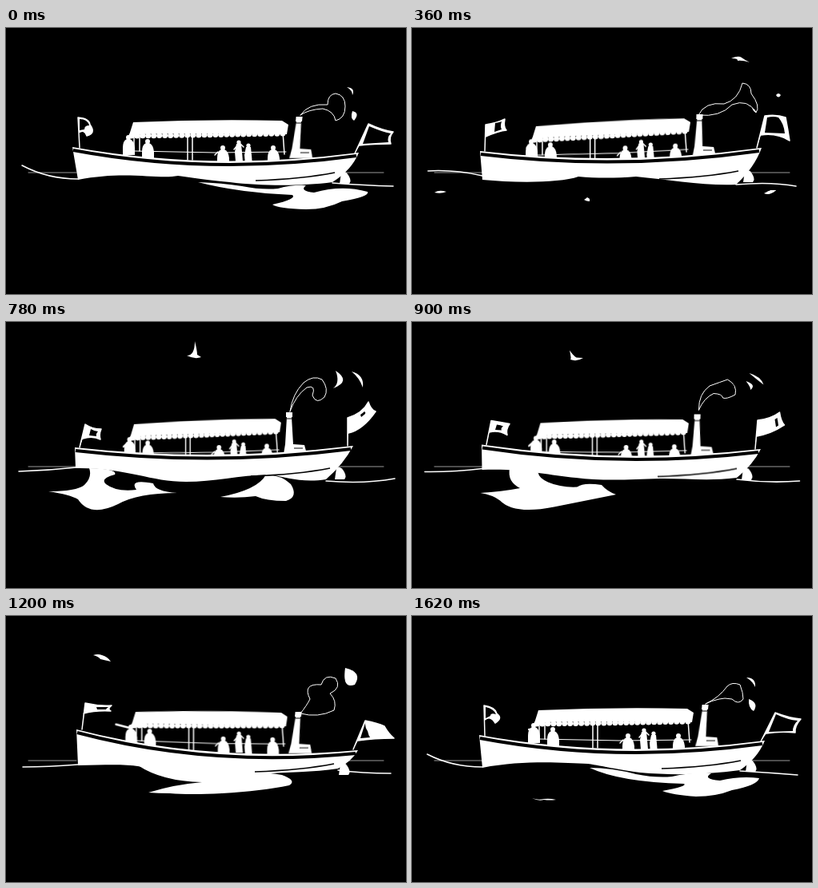
An HTML page without scripts that plays this animation: 500x333 px, repeating every 1680 ms.

```html
<!DOCTYPE html>
<html lang="en">
<head>
<meta charset="utf-8">
<title>Steam launch</title>
<style>
html, body { margin: 0; width: 100%; height: 100%; overflow: hidden; background: #000; }
svg { display: block; width: 100%; height: 100%; }
.white { fill: #fff; }
.line { fill: none; stroke: #fff; stroke-width: 1.5; stroke-linecap: round; stroke-linejoin: round; }
.thin { stroke-width: 1; }

/* Each segment advances in 60 ms steps; the rest pose is both first and last. */
.move { animation: 1680ms steps(6) infinite; }

.hull { animation-name: hull; d: path("M83,149Q255,180 441,156Q432,178 408,193C370,198 320,198 280,193C250,190 235,188 215,185C190,190 150,178 90,190Z"); }
@keyframes hull {
  21.42% { animation-timing-function: steps(7); d: path("M85,154Q258,174 437,150Q428,175 405,196C370,198 320,190 280,186C255,188 230,188 208,186C185,194 130,194 88,190Z"); }
  46.42% { animation-timing-function: steps(4); d: path("M86,157Q260,176 434,155Q422,178 400,197C370,202 350,194 330,191C290,192 260,200 225,200C180,200 150,182 87,183Z"); }
  60.71% { animation-timing-function: steps(3); d: path("M88,150Q258,181 438,163Q430,180 412,193C370,197 330,197 290,201C250,203 210,198 185,190C160,184 130,184 88,187Z"); }
  71.42% { animation-timing-function: steps(4); d: path("M88,142Q255,185 440,168Q432,182 415,191C385,196 350,195 320,198C280,206 220,205 190,196C170,184 140,186 90,187Z"); }
  85.71% { animation-timing-function: steps(3); d: path("M86,143Q255,183 440,163Q432,182 412,194C370,196 330,198 290,196C260,193 240,190 215,186C180,182 140,190 90,188Z"); }
  96.42% { animation-timing-function: steps(1); d: path("M84,149Q255,180 441,156Q432,178 410,193C370,198 330,200 285,196C255,192 240,188 220,185C190,184 140,180 88,190Z"); }
}

.stripe { animation-name: stripe; fill: none; stroke: #000; stroke-width: 4; d: path("M84,153Q255,185 438,160"); }
@keyframes stripe {
  21.42% { animation-timing-function: steps(7); d: path("M86,158Q258,179 434,154"); }
  46.42% { animation-timing-function: steps(4); d: path("M87,161Q260,181 431,159"); }
  60.71% { animation-timing-function: steps(3); d: path("M89,154Q258,186 435,167"); }
  71.42% { animation-timing-function: steps(4); d: path("M89,146Q255,190 437,172"); }
  85.71% { animation-timing-function: steps(3); d: path("M87,147Q255,188 437,167"); }
  96.42% { animation-timing-function: steps(1); d: path("M85,153Q255,185 438,160"); }
}

.deck { animation-name: deck; transform: matrix(1, 0, 0, 1, 0, 0); }
@keyframes deck {
  21.42% { animation-timing-function: steps(7); transform: matrix(.995, -.042, 0, 1, -3.2, 11.7); }
  46.42% { animation-timing-function: steps(4); transform: matrix(.948, -.026, 0, 1, 9.3, 14.1); }
  60.71% { animation-timing-function: steps(3); transform: matrix(.964, 0, 0, 1, 7.8, 7); }
  71.42% { animation-timing-function: steps(4); transform: matrix(.979, .016, 0, 1, 6.3, -.5); }
  85.71% { animation-timing-function: steps(3); transform: matrix(1.005, .021, 0, 1, .2, -4.3); }
  96.42% { animation-timing-function: steps(1); transform: matrix(1, 0, 0, 1, -1, 0); }
}

.arm { animation-name: arm; d: path("M150,143L150,143"); }
@keyframes arm {
  60.71% { animation-timing-function: steps(3); d: path("M150,141L143,147"); }
  71.42% { animation-timing-function: steps(4); d: path("M151,138L134,134"); }
  85.71% { animation-timing-function: steps(3); d: path("M151,143L142,140"); }
}

.funnel { animation-name: funnel; transform: translate(362px, 155px) skewX(-6deg); }
@keyframes funnel {
  21.42% { animation-timing-function: steps(7); transform: translate(358px, 152px) skewX(-2deg); }
  46.42% { animation-timing-function: steps(4); transform: translate(354px, 157px) skewX(0deg); }
  60.71% { animation-timing-function: steps(3); transform: translate(357px, 162px) skewX(-3deg); }
  71.42% { animation-timing-function: steps(4); transform: translate(361px, 164px) skewX(-6deg); }
  85.71% { animation-timing-function: steps(3); transform: translate(363px, 160px) skewX(-8deg); }
  96.42% { animation-timing-function: steps(1); transform: translate(362px, 155px) skewX(-6deg); }
}

.prow { animation-name: prow; transform: translate(0, 0); }
@keyframes prow {
  21.42% { animation-timing-function: steps(7); transform: translate(-3px, -2px); }
  46.42% { animation-timing-function: steps(4); transform: translate(-6px, 2px); }
  60.71% { animation-timing-function: steps(3); transform: translate(-4px, 3px); }
  71.42% { animation-timing-function: steps(4); transform: translate(-1px, 4px); }
  85.71% { animation-timing-function: steps(3); transform: translate(-1px, 3px); }
  96.42% { animation-timing-function: steps(1); transform: translate(0, 0); }
}

.stern-flag { animation-name: stern-flag; fill: #fff; d: path("M92,150L90,112Q104,113 105,121Q113,132 101,135Q98,126 91,131"); }
@keyframes stern-flag {
  21.42% { animation-timing-function: steps(7); d: path("M91,154L92,121Q106,119 116,114Q114,124 118,128Q108,129 92,136"); }
  46.42% { animation-timing-function: steps(4); d: path("M92,157L99,128Q108,134 119,134Q116,141 118,147Q108,142 96,146"); }
  60.71% { animation-timing-function: steps(3); d: path("M94,150L99,119Q114,117 125,121Q118,128 120,136Q108,128 97,130"); }
  71.42% { animation-timing-function: steps(4); d: path("M95,142L99,109Q116,113 132,112Q126,117 131,119Q112,118 97,122"); }
  85.71% { animation-timing-function: steps(3); d: path("M94,143L94,108Q112,110 124,111Q126,117 112,119Q104,128 95,124"); }
  96.42% { animation-timing-function: steps(1); d: path("M91,150L90,112Q104,114 106,122Q114,128 104,134Q98,124 91,130"); }
}
.stern-gap { animation-name: stern-gap; d: path("M92,114Q102,114 104,122Q98,122 98,127L92,128Z"); }
@keyframes stern-gap {
  21.42% { animation-timing-function: steps(7); d: path("M104,119Q110,118 112,117Q110,123 112,127L103,130Z"); }
  46.42% { animation-timing-function: steps(4); d: path("M106,134Q111,137 115,137Q112,140 113,143L104,142Z"); }
  60.71% { animation-timing-function: steps(3); d: path("M106,123Q111,121 113,124Q109,126 111,128L104,128Z"); }
  71.42% { animation-timing-function: steps(4); d: path("M113,114Q122,114 128,114Q125,116 125,117L114,117Z"); }
  85.71% { animation-timing-function: steps(3); d: path("M96,111Q108,111 114,112Q109,116 111,118L96,122Z"); }
  96.42% { animation-timing-function: steps(1); d: path("M92,114Q102,116 105,123Q98,121 98,125L92,128Z"); }
}

.bow-flag { animation-name: bow-flag; fill: #fff; d: path("M436,157L453,120Q470,128 484,130Q478,137 481,145Q460,145 442,147"); }
@keyframes bow-flag {
  21.42% { animation-timing-function: steps(7); d: path("M431,150L441,110Q456,108 467,112Q470,128 472,141Q456,131 436,134"); }
  46.42% { animation-timing-function: steps(4); d: path("M427,155L427,120Q446,114 453,100Q456,110 462,112Q446,135 428,139"); }
  60.71% { animation-timing-function: steps(3); d: path("M431,163L437,126Q452,128 466,126Q466,138 469,146Q452,145 434,147"); }
  71.42% { animation-timing-function: steps(4); d: path("M434,167L449,131Q464,134 473,138Q478,147 485,153Q460,153 440,156"); }
  85.71% { animation-timing-function: steps(3); d: path("M437,162L455,128Q470,132 484,131Q478,140 481,148Q462,147 443,151"); }
  96.42% { animation-timing-function: steps(1); d: path("M436,157L454,121Q472,128 486,129Q478,138 479,146Q460,144 443,147"); }
}
.bow-gap { animation-name: bow-gap; d: path("M454,123Q470,130 481,132Q476,137 478,143L446,145Z"); }
@keyframes bow-gap {
  21.42% { animation-timing-function: steps(7); d: path("M444,112Q452,110 458,112Q465,120 466,132L441,131Z"); }
  46.42% { animation-timing-function: steps(4); d: path("M443,116Q446,114 448,112Q450,113 449,115L444,119Z"); }
  60.71% { animation-timing-function: steps(3); d: path("M464,128Q464,128 465,128Q465,138 467,144L466,144Z"); }
  71.42% { animation-timing-function: steps(4); d: path("M449,134Q449,140 452,144Q453,149 455,152L443,153Z"); }
  85.71% { animation-timing-function: steps(3); d: path("M455,131Q457,131 460,131Q454,139 456,144L448,147Z"); }
  96.42% { animation-timing-function: steps(1); d: path("M455,123Q470,130 482,131Q476,137 476,144L446,145Z"); }
}

.plume { animation-name: plume; d: path("M368,109Q378,94 402,96Q402,83 412,82Q424,84 424,98Q424,113 412,116Q410,104 396,101Q378,102 368,109Z"); }
@keyframes plume {
  21.42% { animation-timing-function: steps(7); d: path("M358,109Q366,92 390,95Q408,90 413,69Q424,70 424,82Q436,98 430,106Q420,88 400,96Q385,112 358,109Z"); }
  46.42% { animation-timing-function: steps(4); d: path("M355,112Q358,90 372,76Q384,66 395,72Q404,84 398,94Q388,104 383,92Q388,78 376,82Q362,92 355,112Z"); }
  60.71% { animation-timing-function: steps(3); d: path("M362,108Q358,90 372,84Q388,84 394,72Q410,74 410,88Q398,90 394,98Q388,102 378,97Q368,98 362,108Z"); }
  71.42% { animation-timing-function: steps(4); d: path("M368,122Q376,112 380,104Q370,84 394,86Q398,72 412,78Q420,90 405,97Q414,106 410,118Q390,128 368,122Z"); }
  85.71% { animation-timing-function: steps(3); d: path("M370,115Q376,98 404,95Q412,94 412,102Q420,106 418,112Q412,120 406,116Q402,106 392,106Q378,106 370,115Z"); }
  96.42% { animation-timing-function: steps(1); d: path("M367,110Q384,102 394,88Q400,82 410,86Q414,96 414,104Q408,112 400,104Q390,102 384,104Q374,106 367,110Z"); }
}
.plume-gap { animation-name: plume-gap; d: path("M407,88Q414,84 419,92Q419,102 411,97Z"); }
@keyframes plume-gap {
  21.42% { animation-timing-function: steps(7); d: path("M364,106Q370,97 388,98Q382,107 364,106Z"); }
  46.42% { animation-timing-function: steps(4); d: path("M386,80Q392,71 397,78Q397,92 390,92Z"); }
  60.71% { animation-timing-function: steps(3); d: path("M393,81Q402,74 408,82Q402,86 394,92Z"); }
  71.42% { animation-timing-function: steps(4); d: path("M386,112Q396,98 409,108Q406,120 394,120Z"); }
  85.71% { animation-timing-function: steps(3); d: path("M388,102Q396,97 408,99Q406,104 399,104Z"); }
  96.42% { animation-timing-function: steps(1); d: path("M402,90Q406,86 410,92Q410,100 405,97Z"); }
}

.puff-a { animation-name: puff-a; d: path("M426,74Q437,75 433,84Q433,78 426,74Z"); }
@keyframes puff-a {
  21.42% { animation-timing-function: steps(7); d: path("M455,84Q458,80 461,84Q458,89 455,84Z"); }
  46.42% { animation-timing-function: steps(4); d: path("M432,62Q448,66 446,82Q442,70 432,62Z"); }
  60.71% { animation-timing-function: steps(3); d: path("M411,66Q424,70 433,75Q420,74 411,66Z"); }
  71.42% { animation-timing-function: steps(4); d: path("M424,65Q446,70 436,86Q420,92 424,65Z"); }
  85.71% { animation-timing-function: steps(3); d: path("M430,67Q449,66 436,88Q424,88 430,67Z"); }
  96.42% { animation-timing-function: steps(1); d: path("M418,77Q430,77 429,89Q426,82 418,77Z"); }
}
.puff-b { animation-name: puff-b; d: path("M433,104Q443,106 435,116Q430,113 433,104Z"); }
@keyframes puff-b {
  21.42% { animation-timing-function: steps(7); d: path("M425,100Q430,102 430,106Q427,105 425,100Z"); }
  46.42% { animation-timing-function: steps(4); d: path("M412,61Q432,74 409,83Q418,76 412,61Z"); }
  60.71% { animation-timing-function: steps(3); d: path("M423,87Q430,83 437,87Q430,89 423,87Z"); }
  71.42% { animation-timing-function: steps(4); d: path("M424,88Q424,88 424,88Q424,88 424,88Z"); }
  85.71% { animation-timing-function: steps(3); d: path("M443,87Q450,94 444,102Q442,97 443,87Z"); }
  96.42% { animation-timing-function: steps(1); d: path("M421,104Q434,109 427,119Q420,115 421,104Z"); }
}

.bird { animation-name: bird; d: path("M490,32Q490,32 490,32Q490,32 490,32Q490,32 490,32Q490,32 490,32Z"); }
@keyframes bird {
  10.71% { animation-timing-function: steps(3); d: path("M490,32Q490,32 490,32Q490,32 490,32Q490,32 490,32Q490,32 490,32Z"); }
  21.42% { animation-timing-function: steps(7); d: path("M399,38Q408,34 412,37Q416,40 422,43Q412,40 407,41Q408,38 399,38Z"); }
  46.42% { animation-timing-function: steps(4); d: path("M236,24Q239,36 239,41Q241,42 244,44Q236,47 226,42Q236,42 236,24Z"); }
  60.71% { animation-timing-function: steps(3); d: path("M158,47Q165,49 172,48Q178,47 184,46Q176,53 170,52Q163,51 158,47Z"); }
  71.42% { animation-timing-function: steps(4); d: path("M109,49Q115,47 120,49Q127,51 131,57Q122,55 118,54Q116,51 109,49Z"); }
  85.71%, 100% { d: path("M40,56Q40,56 40,56Q40,56 40,56Q40,56 40,56Q40,56 40,56Z"); }
}

.swell { animation-name: swell; d: path("M333,221Q364,214 358,209Q290,206 240,193Q270,194 295,198Q320,203 340,201Q358,196 375,197Q366,204 385,206Q420,196 452,205Q455,211 420,217Q400,227 375,227Q340,226 333,221Z"); }
@keyframes swell {
  21.42% { animation-timing-function: steps(1); d: path("M440,207Q442,206 444,205Q445,204 446,204Q447,204 448,203Q449,203 450,203Q452,203 453,203Q454,203 455,203Q455,204 454,204Q452,206 449,207Q447,208 445,208Q442,208 440,207Z"); }
  25% { animation-timing-function: steps(6); d: path("M40,204Q40,204 40,204Q40,204 40,204Q40,204 40,204Q40,204 40,204Q40,204 40,204Q40,204 40,204Q40,204 40,204Q40,204 40,204Q40,204 40,204Q40,204 40,204Z"); }
  46.42% { animation-timing-function: steps(4); d: path("M53,212Q88,212 98,204Q108,194 104,183Q140,184 136,191Q117,196 125,203Q138,213 163,210Q153,196 184,202Q186,212 214,214Q165,214 140,228Q105,245 90,222Q80,216 53,212Z"); }
  60.71% { animation-timing-function: steps(3); d: path("M118,216Q135,213 172,212Q130,206 140,184Q170,182 180,188Q200,194 215,198Q235,202 250,203Q275,205 290,206Q302,212 296,218Q270,233 215,235Q150,238 130,225Q122,217 118,216Z"); }
  71.42% { animation-timing-function: steps(4); d: path("M178,221Q210,211 245,208Q195,207 165,187Q200,186 220,192Q250,196 270,196Q295,196 310,196Q330,196 345,199Q364,206 354,212Q320,219 270,222Q230,224 205,222Q190,222 178,221Z"); }
  85.71% { animation-timing-function: steps(3); d: path("M255,220Q275,215 287,207Q245,207 210,191Q245,192 290,203Q310,198 340,196Q395,195 408,204Q380,206 372,211Q395,212 408,216Q360,217 330,220Q300,222 280,221Q265,221 255,220Z"); }
  96.42% { animation-timing-function: steps(1); d: path("M313,219Q345,213 340,210Q260,208 222,190Q250,190 280,198Q305,203 325,201Q350,195 374,197Q362,204 385,206Q410,200 434,203Q432,212 400,218Q380,226 355,226Q325,224 313,219Z"); }
}

.ripple { animation-name: ripple; d: path("M200,222Q200,222 200,222Q200,222 200,222Q200,222 200,222Q200,222 200,222Z"); }
@keyframes ripple {
  21.42% { animation-timing-function: steps(7); d: path("M215,215Q217,214 219,212Q221,213 222,214Q222,216 222,217Q218,217 215,215Z"); }
  46.42% { animation-timing-function: steps(4); d: path("M268,219Q315,210 325,191Q345,192 356,203Q366,219 350,224Q325,224 312,218Q290,221 268,219Z"); }
  60.71% { animation-timing-function: steps(3); d: path("M345,195Q345,195 345,195Q345,195 345,195Q345,195 345,195Q345,195 345,195Z"); }
  71.42% { animation-timing-function: steps(4); d: path("M75,205Q75,205 75,205Q75,205 75,205Q75,205 75,205Q75,205 75,205Z"); }
  85.71% { animation-timing-function: steps(3); d: path("M84,218Q92,219 102,215Q102,227 118,236Q108,233 98,234Q95,224 84,218Z"); }
  96.42% { animation-timing-function: steps(1); d: path("M150,228Q158,231 165,229Q172,228 180,230Q172,231 165,230Q158,232 150,228Z"); }
}

.fleck { animation-name: fleck; d: path("M20,200Q20,200 20,200Q20,200 20,200Z"); }
@keyframes fleck {
  21.42% { animation-timing-function: steps(7); d: path("M28,206Q34,202 43,205Q36,208 28,206Z"); }
  46.42%, 100% { d: path("M60,212Q60,212 60,212Q60,212 60,212Z"); }
}

.wake { animation-name: wake; d: path("M20,172Q52,189 90,189M408,194Q448,197 484,198"); }
@keyframes wake {
  21.42% { animation-timing-function: steps(7); d: path("M20,179Q52,177 88,185M405,196Q448,192 480,198"); }
  46.42% { animation-timing-function: steps(4); d: path("M16,187Q52,186 88,182M400,199Q448,203 486,196"); }
  60.71% { animation-timing-function: steps(3); d: path("M16,188Q52,190 88,185M412,195Q445,201 483,202"); }
  71.42% { animation-timing-function: steps(4); d: path("M21,189Q52,189 90,186M415,193Q445,197 481,197"); }
  85.71% { animation-timing-function: steps(3); d: path("M19,183Q42,192 90,188M412,195Q445,196 483,200"); }
  96.42% { animation-timing-function: steps(1); d: path("M19,173Q50,189 88,189M410,194Q445,196 482,199"); }
}
</style>
</head>
<body>
<svg viewBox="0 0 500 333" preserveAspectRatio="none">
  <defs>
    <g id="person">
      <circle cy="3" r="3"/>
      <path d="M-2,5Q-7,7 -7,16V25H8V16Q7,7 2,5Z"/>
    </g>
    <g id="standing">
      <circle cy="3" r="2.6"/>
      <path d="M-3,5L-5,15L-4,27H5L4,15L3,5Z"/>
    </g>
  </defs>
  <rect width="500" height="333"/>

  <path class="line thin" d="M28,181H88M414,181H472" stroke-opacity=".6"/>
  <path class="line move wake"/>
  <path class="white move bird"/>

  <path class="line move bow-flag"/>
  <path class="move bow-gap"/>
  <path class="line move stern-flag"/>
  <path class="move stern-gap"/>

  <g class="white">
    <path class="line thin white move plume"/>
    <path class="move plume-gap" fill="#000"/>
    <path class="move puff-a"/>
    <path class="move puff-b"/>
    <g class="move funnel">
      <path d="M-4,-44H4V-38H3L5,-4L19,-3L22,8H-7L-5,-4L-3,-38H-4Z"/>
      <path d="M6,1H17M-3,-36H3" stroke="#000"/>
    </g>
  </g>

  <g class="white move deck">
    <path class="line" d="M160,132V158M167,132V154M227,134V165M233,134V165M346,130L348,158"/>
    <path class="line thin" d="M160,154L262,156L350,155"/>
    <path d="M159,118Q250,114 345,116L353,121L351,133Q250,131 166,133L153,137Z"/>
    <path class="line" d="M157,135Q250,134 349,132" stroke-dasharray="0 7" style="stroke-width:7"/>
    <use href="#person" x="153" y="134"/>
    <use href="#person" x="177" y="139"/>
    <use href="#person" x="271" y="147"/>
    <use href="#standing" x="291" y="140"/>
    <use href="#standing" x="303" y="144"/>
    <use href="#person" x="334" y="147"/>
    <path class="line" d="M290,146L285,152M292,144L297,149M265,155L261,159"/>
    <path class="line move arm" style="stroke-width:2.5"/>
  </g>

  <path class="white move swell"/>
  <path class="white move ripple"/>
  <path class="white move fleck"/>
  <path class="white move hull"/>
  <path class="move stripe"/>
  <g class="move prow">
    <path d="M312,191Q370,189 411,181" fill="none" stroke="#000" stroke-width="1.5"/>
    <path class="white" d="M419,181Q424,177 429,186Q432,192 429,195H417Z"/>
  </g>
</svg>
</body>
</html>
```
